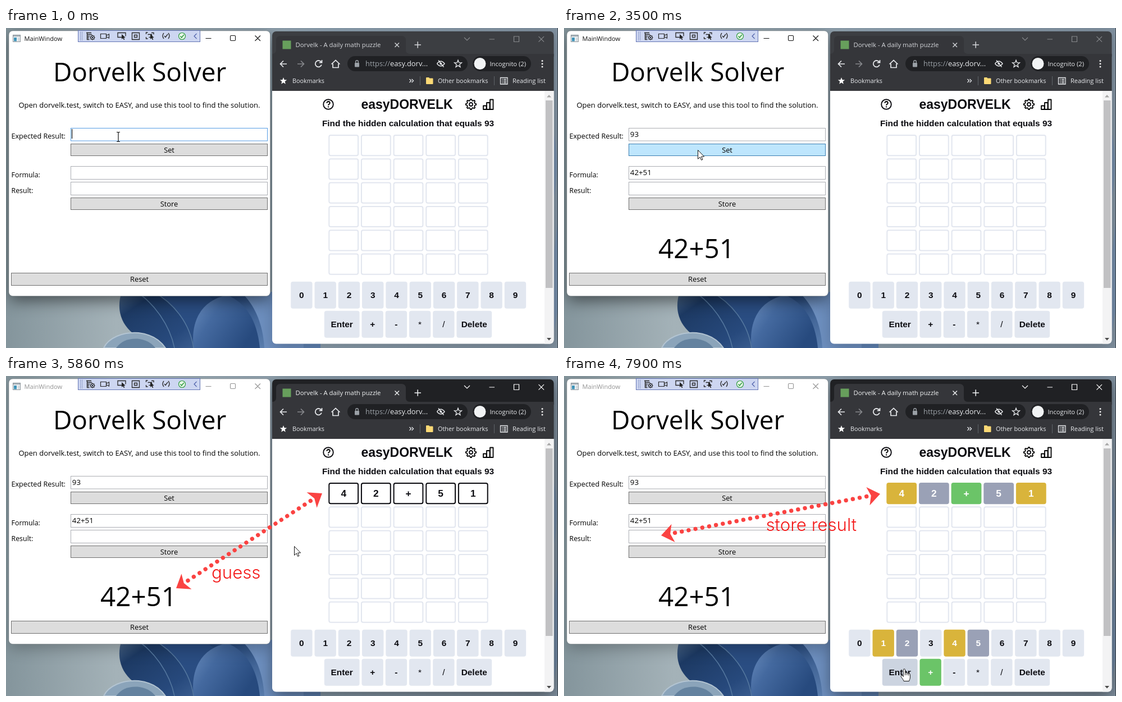
These frames come from a looping animation (983 px wide and 570 px high, 8000 ms). An HTML page:

```html
<!DOCTYPE html>
<html lang="en">
<head>
<meta charset="utf-8">
<title>Puzzle solver demo</title>
<style>
html, body { margin: 0; width: 100%; height: 100%; overflow: hidden; background: #8c9ca5; }
svg { display: block; width: 100%; height: 100%; font-family: "Open Sans", "Noto Sans", sans-serif; }
.page { font-family: "Liberation Sans", Arial, sans-serif; font-weight: bold; }
.note { font-family: Inter, sans-serif; font-weight: 350; fill: #f41818; }
.mid { text-anchor: middle; }
.line { fill: none; stroke: currentColor; }
</style>
</head>
<body>
<svg id="stage" viewBox="0 0 983 570" preserveAspectRatio="none"></svg>
<script>
const LOOP = 8000;
const CELL = { x: 574.3, y: 190, w: 53.8, h: 38.2, dx: 57.65, dy: 42.3 };
const GUESS = [['4', 4830], ['2', 5000], ['+', 5360], ['5', 5530], ['1', 5700]];
const POP = 160, REVEAL = 7360;
const YELLOW = '#d9b43b', GRAY = '#9aa1b6', GREEN = '#6bc468';
const CELL_COLORS = [YELLOW, GRAY, GREEN, GRAY, YELLOW];
const KEY_COLORS = { 1: YELLOW, 4: YELLOW, 2: GRAY, 5: GRAY, '+': GREEN };

const text = (x, y, s, size, extra = '') =>
  `<text x="${x}" y="${y}" font-size="${size}" ${extra}>${s}</text>`;
const rect = (x, y, w, h, fill, extra = '') =>
  `<rect x="${x}" y="${y}" width="${w}" height="${h}" fill="${fill}" ${extra}/>`;
const line = (d, width = 1, extra = '') =>
  `<path class="line" d="${d}" stroke-width="${width}" ${extra}/>`;
const group = (extra, body) => `<g ${extra}>${body}</g>`;

function polygon(cx, cy, radii, n, turn = 0) {
  const pts = Array.from({ length: n }, (_, i) => {
    const a = turn + i * 2 * Math.PI / n, r = radii[i % radii.length];
    return `${(cx + r * Math.cos(a)).toFixed(2)} ${(cy + r * Math.sin(a)).toFixed(2)}`;
  });
  return `M${pts.join('L')}Z`;
}
const star = (x, y, r) => polygon(x, y, [r, r * 0.42], 10, -Math.PI / 2);

function wallpaper() {
  return `<defs>
    <linearGradient id="sky" x2="1" y2="0"><stop stop-color="#84959c"/><stop offset=".2" stop-color="#a4b2b8"/>
      <stop offset=".6" stop-color="#8c9fae"/><stop offset="1" stop-color="#8191a0"/></linearGradient>
    <linearGradient id="petal" x2="1" y2=".4"><stop stop-color="#4d6a8c"/><stop offset=".16" stop-color="#1d3a64"/>
      <stop offset=".5" stop-color="#27497c"/><stop offset="1" stop-color="#5f83b4"/></linearGradient>
    <linearGradient id="petal2" x2="1" y2=".5"><stop stop-color="#6c8fc0"/><stop offset=".4" stop-color="#44699f"/>
      <stop offset="1" stop-color="#274a7e"/></linearGradient>
    <filter id="blur" x="-20%" y="-20%" width="140%" height="140%"><feGaussianBlur stdDeviation="14"/></filter>
    </defs>` +
    rect(0, 0, 983, 570, 'url(#sky)') +
    `<path d="M206 470C196 500 204 530 232 548L284 570H560V470Z" fill="url(#petal)"/>
    <path d="M262 470C300 490 328 528 334 570H420C404 520 380 488 350 470Z" fill="#2a4d82"/>
    <path d="M334 570C328 520 350 484 394 476C430 490 448 526 452 570Z" fill="url(#petal2)"/>
    <path d="M262 470C300 490 328 528 334 570M232 470C264 490 292 530 300 570" fill="none" stroke="#55789f" stroke-width="1.5"/>
    <path d="M418 470C446 496 458 532 460 570H530V470Z" fill="#6d8fbf"/>
    <path d="M174 570C182 552 208 541 236 543C262 546 276 558 284 570Z" fill="#8ba4ba" stroke="#b3c4d2" stroke-width="2"/>
    <path d="M196 570C206 556 222 552 238 554C254 557 262 564 266 570Z" fill="#64829f"/>
    <path d="M976 190Q986 240 976 300ZM976 400L983 340V500L976 540Z" fill="#748ca8"/>` +
    rect(982, 0, 1, 570, '#3c464e');
}

function debugBar() {
  let grip = '';
  for (let i = 0; i < 12; i++) grip += rect(132 + (i % 2) * 3, 7 + (i >> 1) * 2.7, 1.2, 1.2, '#6676ac');
  const arrow = (x, y) => `<path d="M${x} ${y}v9l2.2-2 1.7 3.2 1.4-.8-1.5-3 2.8-.3z" fill="#222"/>`;
  return rect(128.5, 4.5, 217, 20, '#cdd6f1', 'stroke="#6475b4"') + grip +
    group('color="#282828"',
      line('M143 8.5h9M145 11.5h8M145 14.5h4M145 17.5h3M144.5 8v12.5h4', 1.3) +
      line(polygon(154, 17, [4, 2.9], 16), 1.2) +
      `<circle cx="154" cy="17" r="1.2"/>` +
      line('M168.500 10.500h10v8h-10zM178.500 13.500l5-2.500v7l-5-2.500', 1.2) +
      line('M206 16.500h-7v-8h14v6', 1.3) + arrow(206, 11) +
      line('M224.500 8.500h13v12h-13zM228.500 12.500h5v4h-5z', 1.3) +
      line('M249.500 11v-3h3M259 8.500h4v3M249.500 16v3h3M252.500 11.500h7v5h-5', 1.3) + arrow(257, 11) +
      line('M281 9q-4 5 0 10M289 9q4 5 0 10M282 14l2 2.500 4-5.500', 1.3)) +
    `<circle cx="313.500" cy="14.500" r="6" fill="#e7f6e8" stroke="#2f9b3f" stroke-width="1.200"/>` +
    line('M310.500 14.500l2.200 2.500 4-5', 1.5, 'color="#2f9b3f"') +
    line('M339.500 10l-4.500 4.500 4.500 4.500', 1.1, 'color="#4a5ca8"');
}

function button(id, x, y, w, h, label) {
  return rect(x, y, w, h, '#ddd', `id="${id}" stroke="#707070"`) +
    text(x + w / 2, y + h / 2 + 4.9, label, 12.8, 'class="mid"');
}
const field = (id, y, h) => rect(115.5, y, 350, h, '#fff', `id="${id}" stroke="#abadb3"`);

function solver() {
  return rect(5, 5, 465.5, 472.5, '#fff', 'rx="7" stroke="#70787c" stroke-opacity=".5"') +
    rect(12.5, 12.5, 13, 12, '#f4f6f8', 'stroke="#8a9298"') + rect(13, 13, 12, 2.5, '#aab4bb') +
    rect(14, 17, 5, 6.5, '#3f93b8') + rect(20.5, 17, 4, 6.5, '#d5dce0') +
    group('id="solverBar"',
      text(32.5, 23, 'MainWindow', 11.1, 'fill="currentColor"') +
      line('M355.500 18.500h10M401 13.500h6q1.500 0 1.500 1.500v6q0 1.500-1.500 1.500h-6q-1.500 0-1.500-1.500v-6q0-1.500 1.500-1.500zM443.500 13.500l9.500 9.500M453 13.500l-9.500 9.500', 1.1)) +
    debugBar() +
    text(238, 95, 'Dorvelk Solver', 45.9, 'class="mid"') +
    text(237.5, 142, 'Open dorvelk.test, switch to EASY, and use this tool to find the solution.', 13, 'class="mid"') +
    text(9.5, 197, 'Expected Result:', 12.6) +
    text(9.5, 265.5, 'Formula:', 12.4) +
    text(9.5, 293.5, 'Result:', 12.4) +
    field('expected', 178.5, 22.5) + field('formula', 246.5, 23) + field('result', 274.5, 23) +
    button('set', 115.5, 206.5, 350, 21, 'Set') +
    button('store', 115.5, 302.5, 350, 21, 'Store') +
    button('reset', 9.5, 436.5, 456, 22, 'Reset') +
    text(117.8, 193.5, '', 13.3, 'id="typed"') +
    rect(117, 180, 1.1, 17, '#000', 'id="caret"') +
    group('id="solution"',
      text(117.8, 262, '42+51', 13.3) + text(236, 410, '42+51', 47.6, 'class="mid"'));
}

function chrome() {
  const icons =
    line('M500 64h-11.500m5.500-5.500l-5.500 5.500 5.500 5.500', 1.7) +
    line('M519 64h11.500m-5.500-5.500l5.500 5.500-5.500 5.500', 1.7, 'color="#86888c"') +
    line('M561.500 61a5.700 5.700 0 1 0 .4 4.500M562.500 57v4.700h-4.700', 1.8) +
    line('M579.500 64.500l7.500-7 7.500 7M582 63.500v7h10v-7', 1.7) +
    line('M770 57.500l9.500 12M767.500 63.500q7-8.500 13.500 0q-6.500 8.500-13.500 0', 1.4) +
    `<circle cx="774.300" cy="63.500" r="2" fill="#dfe1e5"/>` +
    line(star(805, 64, 6.8), 1.3) +
    `<path d="${star(494, 94.5, 6.5)}" fill="#fff"/>` +
    line('M718.500 91l3 3-3 3M722.500 91l3 3-3 3', 1.3) +
    line('M880.500 88.500h12.500v11.500h-12.500zM883 91.500h1.500M883 94.500h1.500M883 97.500h1.500M886 91.500h5M886 94.500h5M886 97.500h5', 1.3) +
    [58.5, 63.7, 69].map(y => `<circle cx="955" cy="${y}" r="1.500" fill="#eee"/>`).join('');
  return `<clipPath id="frame"><rect x="474" y="6" width="501.500" height="556.500" rx="7"/></clipPath>` +
    group('clip-path="url(#frame)"',
      rect(474, 6, 502, 45, '#3c3e42', 'id="tabStrip"') +
      `<path d="M474 46q7 0 7-7V22q0-8 8-8H704q8 0 8 8v17q0 7 7 7H976V113H474Z" fill="#35363a"/>` +
      rect(474, 112, 502, 451, '#fff') +
      rect(959, 112, 17, 451, '#f3f3f4') + rect(961, 129, 12.5, 334, '#c1c1c3') +
      `<path d="M963 123.500l4-4.500 4 4.500z" fill="#a6a6a6"/><path d="M963 552l4 4.500 4-4.500z" fill="#4a4a4a"/>`) +
    rect(492.5, 22.5, 15, 15, '#679f5c') +
    group('id="tabText"',
      text(515.5, 34, 'Dorvelk - A daily math puzzle', 11.3, 'fill="currentColor"') +
      line('M692.500 26.500l7.500 7.500M700 26.500l-7.500 7.500', 1.4) +
      line('M727.500 30h11.500M733.200 24.300v11.500', 1.5)) +
    group('id="browserBar"',
      line('M816 17l5 5 5-5M860.500 20h9.500M904.500 15h9v9.500h-9zM948.500 15.200l9.500 9.500M958 15.200l-9.500 9.500', 1.2)) +
    rect(608, 50, 214, 27, '#202124', 'rx="13.500"') + rect(831, 50, 104, 27, '#202124', 'rx="13.500"') +
    rect(621, 62, 8, 7.5, '#9aa0a6', 'rx="1"') + line('M622.700 62v-2a2.300 2.300 0 0 1 4.600 0v2', 1.4, 'color="#9aa0a6"') +
    `<circle cx="844" cy="63.500" r="10.500" fill="#f1f3f4"/>` +
    group('color="#e8eaed"', icons) +
    group('fill="#e8eaed"',
      text(640, 68, '<tspan fill="#9aa0a6">https://</tspan>easy.dorv...', 12.9) +
      text(861.5, 67.5, 'Incognito (2)', 11.2) + text(510, 98, 'Bookmarks', 10.8) +
      text(769, 98, 'Other bookmarks', 10.9) + text(902, 98, 'Reading list', 11)) +
    `<path d="M748 89q0-1 1-1h4l1.500 1.500h5q1 0 1 1V99q0 1-1 1h-10.500q-1 0-1-1z" fill="#fbd975"/>` +
    rect(737, 86, 1, 16, '#5f6368') + rect(869, 86, 1, 16, '#5f6368');
}

// Keyboard layout: label plus its box.
const keys = [];
for (let i = 0; i < 10; i++) keys.push({ label: String(i), x: 507.2 + i * 42.28, y: 451.7, w: 38.4 });
let keyX = 566.8;
for (const label of ['Enter', '+', '-', '*', '/', 'Delete']) {
  const w = label.length > 1 ? 62.8 : 38.4;
  keys.push({ label, x: keyX, y: 503.8, w });
  keyX += w + 3.84;
}

function game() {
  const cells = Array.from({ length: 30 }, (_, i) => {
    const x = CELL.x + (i % 5) * CELL.dx, y = CELL.y + Math.floor(i / 5) * CELL.dy;
    return group('class="cell"',
      rect(x + 1, y + 1, CELL.w - 2, CELL.h - 2, '#fff', 'rx="3" stroke="#e2e6ef" stroke-width="2"') +
      text(x + CELL.w / 2, y + 25.2, '', 17.3, 'class="mid"'));
  }).join('');
  const board = keys.map(k => group('class="key"',
    rect(k.x, k.y, k.w, 48, '#e2e7f0', 'rx="4"') +
    text(k.x + k.w / 2, k.y + 28.8, k.label, 15.4, `class="mid" ${'*/'.includes(k.label) ? 'font-weight="normal"' : ''}`))).join('');
  return group('class="page" fill="#0b0b10"',
    text(714, 144, 'easyDORVELK', 23, 'class="mid"') +
    text(716, 175, 'Find the hidden calculation that equals 93', 15.4, 'class="mid"') +
    `<circle cx="574" cy="136" r="8.800" fill="none" stroke="#0b0b10" stroke-width="1.900"/>` +
    line('M571.300 133.800q.2-2.800 2.800-2.800t2.700 2.600q0 1.500-1.600 2.300-1.200.6-1.200 1.800', 1.8) +
    `<circle cx="574" cy="140.500" r="1.150"/>` +
    line(polygon(828, 136, [9.2, 9.2, 7, 7], 32, -0.1), 1.8, 'stroke-linejoin="round"') +
    `<circle cx="828" cy="136" r="3" fill="none" stroke="#0b0b10" stroke-width="1.800"/>` +
    line('M850 145v-6.500h5.500v6.500zM856 145v-12h5.500v12zM862 145v-17.500h5.500v17.500z', 1.8, 'stroke-linejoin="round"') +
    cells + board);
}

function doubleArrow(id, x1, y1, x2, y2, label, tx, ty) {
  const len = Math.hypot(x2 - x1, y2 - y1);
  const angle = Math.atan2(y2 - y1, x2 - x1) * 180 / Math.PI;
  const head = 'M0 0L22 16.500 16.500 0 22-16.500Z';
  return group(`id="${id}"`,
    group(`transform="translate(${x1} ${y1}) rotate(${angle})" fill="#fa4342"`,
      `<path d="${head}"/><path d="${head}" transform="translate(${len}) scale(-1 1)"/>
       <path d="M25 0H${len - 22}" stroke="#fa4342" stroke-width="7.400" stroke-linecap="round" stroke-dasharray="0 12.400"/>`) +
    text(tx, ty, label, 31.2, 'class="note"'));
}

function pointers() {
  const skin = 'fill="#fff" stroke="#111" stroke-width="1"';
  return group('id="pointer"',
    `<path id="arrow" d="M.5 .5V16.300L4.200 12.900 6.600 18.300 8.900 17.300 6.600 12H11.600Z" ${skin}/>` +
    `<path id="beam" d="M-3-8.500H-1L0-7.500 1-8.500H3M0-7.500V7.500M-3 8.500H-1L0 7.500 1 8.500H3" fill="none" stroke="#111" stroke-width="1.200"/>` +
    `<path id="hand" d="M-1.800 13.500V1.600a1.700 1.700 0 0 1 3.400 0V7.600a1.600 1.600 0 0 1 3.200 .3a1.600 1.600 0 0 1 3 .6a1.500 1.500 0 0 1 2.600 1V15c0 3-1.400 4-1.800 6.500H-1c-.5-2.600-3-5-4.600-7.600c-.9-2.200 1.300-3.400 2.400-2.200ZM1.600 7.600V11M4.800 8V11M7.800 8.500V11.500" ${skin}/>`);
}

document.getElementById('stage').innerHTML = wallpaper() +
  rect(7, 12, 462, 474, '#000', 'id="solverShade" filter="url(#blur)"') +
  rect(476, 12, 499, 558, '#000', 'id="browserShade" filter="url(#blur)"') +
  solver() + chrome() + game() +
  doubleArrow('guessNote', 303, 378, 563, 209, 'guess', 366, 361) +
  doubleArrow('storeNote', 173, 284, 563, 210, 'store result', 359.5, 276) +
  pointers();

const $ = id => document.getElementById(id);
const set = (node, attrs) => { for (const k in attrs) node.setAttribute(k, attrs[k]); };
const show = (id, on) => $(id).setAttribute('visibility', on ? 'visible' : 'hidden');
const cellNodes = [...document.querySelectorAll('.cell')].slice(0, 5);
const keyNodes = [...document.querySelectorAll('.key')];
const smooth = u => u * u * (3 - 2 * u);

// Pointer path: time, x, y, and 1 where the leg eases in and out.
const PATH = [
  [0, 200, 194], [1430, 200, 194], [1650, 205, 215], [1880, 213, 229], [2000, 219, 228],
  [2130, 238, 217], [3500, 238, 217], [3970, 513, 303, 1], [6560, 513, 303],
  [6680, 550, 392], [6800, 594, 476], [7000, 606, 522], [LOOP, 606, 522]
];

function pointerAt(t) {
  const i = Math.max(1, PATH.findIndex(p => p[0] > t));
  const a = PATH[i - 1], b = PATH[i];
  let u = (t - a[0]) / (b[0] - a[0]);
  if (b[3]) u = smooth(u);
  return [a[1] + (b[1] - a[1]) * u, a[2] + (b[2] - a[2]) * u];
}

function popScale(t, start) {
  const u = (t - start) / POP;
  return u <= 0 || u >= 1 ? 1 : 1 + 0.1 * smooth(1 - Math.abs(2 * u - 1));
}

function drawSolver(t, x, y) {
  const inside = (top, bottom) => x > 115 && x < 466 && y > top && y < bottom;
  const focused = t < 3030;
  const pressed = t >= 3030 && t < 3130;
  const typed = t < 760 ? '' : t < 900 ? '9' : '93';
  $('typed').textContent = typed;
  $('caret').setAttribute('x', 117 + typed.length * 7.8);
  show('caret', t < 260 || (t >= 760 && t < 1430) || (t >= 1930 && t < 2430) || (t >= 2960 && t < 3030));
  show('solution', t >= 3160);

  const overFields = [['expected', 178, 201], ['formula', 246, 270], ['result', 274, 298]].filter(([id, top, bottom]) => {
    const over = inside(top, bottom);
    const border = id === 'expected' && focused ? '#569de5' : over ? '#7eb4ea' : '#abadb3';
    $(id).setAttribute('stroke', border);
    return over;
  });
  const over = inside(206, 227.5);
  set($('set'), {
    fill: pressed ? '#c4e5f6' : over ? '#bee6fd' : '#ddd',
    stroke: pressed ? '#2c628b' : over ? '#3c7fb1' : '#707070'
  });
  return overFields.length > 0;
}

function drawGame(t, x, y) {
  const revealed = t >= REVEAL;
  cellNodes.forEach((node, i) => {
    const [char, start] = GUESS[i];
    const typed = t >= start, [box, label] = node.children;
    const s = popScale(t, revealed ? REVEAL : start);
    const cx = CELL.x + i * CELL.dx + CELL.w / 2, cy = CELL.y + CELL.h / 2;
    node.setAttribute('transform', `translate(${cx} ${cy}) scale(${s}) translate(${-cx} ${-cy})`);
    set(box, {
      fill: revealed ? CELL_COLORS[i] : '#fff',
      stroke: revealed ? CELL_COLORS[i] : typed ? '#0b0b10' : '#e2e6ef'
    });
    label.textContent = typed ? char : '';
    label.setAttribute('fill', revealed ? '#fff' : '#0b0b10');
  });

  let overKey = false;
  keys.forEach((k, i) => {
    const over = x > k.x && x < k.x + k.w && y > k.y && y < k.y + 48;
    const color = revealed && KEY_COLORS[k.label];
    const [box, label] = keyNodes[i].children;
    box.setAttribute('fill', color || (over ? '#ccd4e0' : '#e2e7f0'));
    label.setAttribute('fill', color ? '#fff' : '#0b0b10');
    overKey = overKey || over;
  });
  return overKey;
}

function draw(t) {
  const [x, y] = pointerAt(t);
  const overField = drawSolver(t, x, y);
  const overKey = drawGame(t, x, y);

  const solverActive = t < 4000;
  set($('solverBar'), { color: solverActive ? '#111' : '#929292' });
  set($('browserBar'), { color: solverActive ? '#85878a' : '#fff' });
  set($('tabText'), { color: solverActive ? '#d3d5d9' : '#f1f3f4' });
  set($('tabStrip'), { fill: solverActive ? '#3c3e42' : '#202124' });
  set($('solverShade'), { opacity: solverActive ? 0.5 : 0.25 });
  set($('browserShade'), { opacity: solverActive ? 0.22 : 0.45 });

  show('guessNote', t >= 4060 && t < 6330);
  show('storeNote', t >= 7900);

  // The pointer hides while the number is typed.
  const hidden = t >= 600 && t < 1430;
  $('pointer').setAttribute('transform', `translate(${x} ${y})`);
  show('beam', overField && !hidden);
  show('hand', overKey);
  show('arrow', !overField && !overKey);
}

function tick() {
  draw(performance.now() % LOOP);
  requestAnimationFrame(tick);
}
tick();
</script>
</body>
</html>
```
